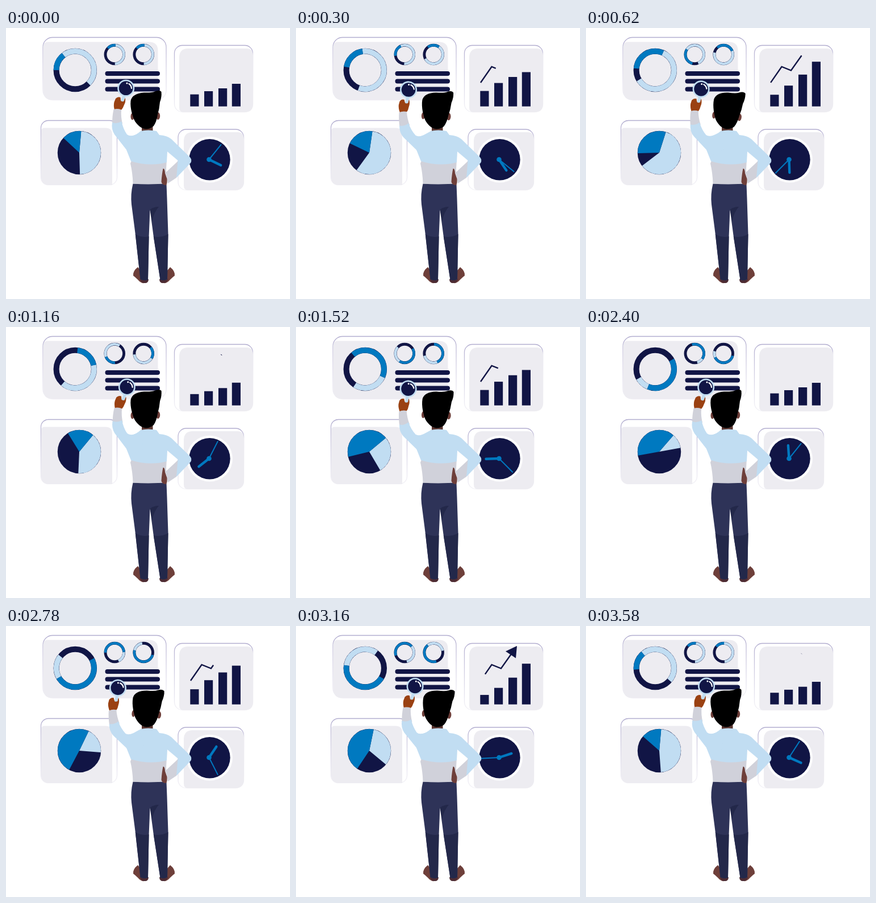
An HTML page for the animation above (3.6 s loop, 500x476 px).

```html
<!DOCTYPE html>
<html lang="en">
<head>
<meta charset="utf-8">
<title>Dashboard</title>
<style>
  html, body { margin: 0; width: 100%; height: 100%; overflow: hidden; background: #fff; }
  svg { display: block; width: 500px; height: 476px; }
  .navy { fill: #111545; }
  .light { fill: #c1ddf2; }
  .cloth { fill: #d0d1da; }
  .skin { fill: #6e3f3a; }
  .ring circle { fill: none; }
  .ring .base { stroke: #111545; }
  .ring .a { stroke: #c1ddf2; }
  .ring .b { stroke: #0079c0; }
  .hand { stroke: #0079c0; stroke-linecap: round; }
</style>
</head>
<body>
<svg viewBox="0 0 500 476" xmlns="http://www.w3.org/2000/svg">
  <defs>
    <linearGradient id="edge" x1="0" y1="0" x2="0" y2="1">
      <stop offset="0" stop-color="#b3aed0"/>
      <stop offset=".5" stop-color="#d6d3e5"/>
      <stop offset="1" stop-color="#f3f2f7"/>
    </linearGradient>
  </defs>

  <g fill="#fff" stroke="url(#edge)" stroke-width="1.300">
    <rect x="65" y="16.500" width="217" height="110" rx="17"/>
    <rect x="296.500" y="30.500" width="138" height="117" rx="14"/>
    <rect x="61.500" y="162.500" width="134" height="113" rx="13"/>
    <rect x="303" y="178" width="115.500" height="106.500" rx="14"/>
  </g>
  <g fill="#edecf1">
    <path d="M65.500 32Q66 24.500 74 24.500H252Q267.500 24.500 267.500 40V126.500H82Q65.500 126.500 65.500 109Z"/>
    <path d="M305 52Q305 36 321 36H423Q435 36 435 48V133Q435 148 420 148H313Q305 148 305 140Z"/>
    <path d="M62 181Q62 175.500 68 175.500H175Q187 175.500 187 187V276H76Q62 276 62 262Z"/>
    <path d="M313 199Q313 183 329 183H407Q419 183 419 195V269Q419 285 403 285H321Q313 285 313 277Z"/>
  </g>

  <path d="M178.500 80H267M178.500 93.500H267M178.500 107.500H267" stroke="#111545" stroke-width="8" stroke-linecap="round"/>
  <g id="charts"></g>

  <g id="bars" class="navy"></g>
  <path id="trend" d="M325 96L344.500 68L361 74.500L379.500 48.500" pathLength="1" fill="none" stroke="#111545" stroke-width="2.400"/>
  <path id="tip" class="navy" d="M389 35L369 44.500L387 56.500Z"/>

  <circle cx="358.500" cy="231.200" r="40.500" fill="#fff"/>
  <circle cx="358.500" cy="231.200" r="36.200" class="navy"/>
  <path id="hour" class="hand" d="M357.500 231V208" stroke-width="4.400"/>
  <path id="minute" class="hand" d="M357.500 231V197.500" stroke-width="2"/>
  <circle cx="357.500" cy="231" r="4.300" fill="#0079c0"/>

  <g class="skin">
    <path d="M232 420Q223 427 224 435Q228 438 232 442Q238 449 243 448Q251 448 250 441Z"/>
    <path d="M289 420Q298 427 297 435Q293 438 289 442Q283 449 278 448Q270 448 271 441Z"/>
  </g>
  <path d="M235 440Q242 445 251 441Q251 449 243 448Q238 448 235 440ZM286 440Q279 445 270 441Q270 449 278 448Q283 448 286 440Z" fill="#4d2c34"/>
  <path d="M223.500 273.500Q219 292 221 310L228 364L236.500 441Q243 445 250 442L251.500 368L253.500 319L259.500 364L271.500 442Q278 445 284 441L285.500 362L283.500 300L282.500 273.500Z" fill="#2e3358"/>
  <path d="M227.700 362Q239 369 251.600 366L250 442Q243 445 236.500 441ZM259.700 366Q273 369 285.500 362L284 441Q278 445 271.500 442ZM253.500 319Q260 314 269 314Q261 323 257.500 338Z" fill="#23284a"/>

  <path d="M239 172H258.500V184H239Z" fill="#5b3631"/>
  <path class="cloth" d="M222 230L283 230L281.500 258L284 273Q254 275.500 223.500 273.500Q223 255 219 238Z"/>
  <path class="light" d="M237 181Q250 178 265 181L270 188Q284 189 291 195L324 227Q328 232 325 237L300 263V237L303 233L284 217L283 236Q253 244 220 234L212 214L220 190Q230 188 237 181Z"/>
  <path class="cloth" d="M302.500 234L300 263L285 273L281 254Z"/>
  <path class="skin" d="M276.500 247Q279.500 246 280 255L283.500 265Q284 272 282 276Q274.500 276 273.500 270Q274.500 256 276.500 247Z"/>

  <g id="arm">
    <path d="M193 124Q197 120 201.500 122L202 127Q206 128 210 123Q211 130 208 135Q206 141 203 144H191Q189 136 190.500 130Z" fill="#9a4112"/>
    <path class="light" d="M205.500 118L210.500 120L207.500 128.500Q205 130 202 128Z"/>
    <path class="cloth" d="M189.500 143Q196 141 203 143.500Q202 156 205 168L187 168Q187 154 189.500 143Z"/>
    <path class="light" d="M187 166Q195 169 203.500 164Q206 177 213 187Q218 191 227 188L238 184L242 215L220 224L209 210L191 187Q185 178 187 166Z"/>
    <circle cx="211.200" cy="105.700" r="13.700" class="navy" stroke="#c1ddf2" stroke-width="2.600"/>
    <path d="M216.500 98Q220.500 100.500 221 106" fill="none" stroke="#fff" stroke-width="2.200" stroke-linecap="round"/>
    <circle cx="213" cy="97" r="1.500" fill="#fff"/>
  </g>

  <g id="head">
    <ellipse cx="267.500" cy="154.500" rx="3.700" ry="6.500" class="skin"/>
    <ellipse cx="222.500" cy="155.500" rx="3" ry="6" class="skin"/>
    <path d="M221.500 149Q218.500 137 219.500 128Q222 115 243 113.500Q257 114 262 111.500Q270 108 273.500 112Q274.500 121 271 130Q270 142 267 152Q265 165 260 172Q254 177.500 246 177.500Q238 176.500 232 170Q226 164 224 157Z"/>
  </g>
</svg>

<script>
const $ = id => document.getElementById(id);
const LOOP = 3600, STEP = 20, BEAT = 1200;
const { sin, cos, PI, min, max } = Math;
const rad = d => d * PI / 180;
const ease = p => (1 - cos(PI * min(1, max(0, p)))) / 2;
const spin = (id, deg, x, y) => $(id).setAttribute('transform', `rotate(${deg} ${x} ${y})`);

// centre, mid radius, stroke width, angle in degrees by phase
const charts = [
  { x: 121.8, y: 74, r: 33.2, w: 9.6, turn: d => d - 38 },
  { x: 191.3, y: 46.5, r: 16.3, w: 4.4, turn: d => 5 - d },
  { x: 242.2, y: 46.5, r: 16.3, w: 4.4, turn: d => 5 + d },
  { x: 129, y: 219, r: 19, w: 38, turn: d => 29 - 24 * cos(rad(d)) }
];
$('charts').innerHTML = charts.map(c => `<g class="ring" transform="translate(${c.x} ${c.y})">` +
  ['base', 'a', 'b'].map(k =>
    `<circle class="${k}" r="${c.r}" stroke-width="${c.w + (k === 'base' ? .5 : 0)}" pathLength="360"/>`).join('') +
  '</g>').join('');
charts.forEach((c, i) => {
  const g = $('charts').children[i];
  c.a = g.querySelector('.a');
  c.b = g.querySelector('.b');
});

// left edge, mean top, cosine and sine swing
const bars = [
  [324.3, 116.6, 0, 6],
  [349, 105.6, 5.4, 9],
  [374, 93.5, 12.5, 7.5],
  [397.8, 78.5, 19.5, 1]
];
$('bars').innerHTML = bars.map(b => `<rect x="${b[0]}" width="15.200"/>`).join('');

function arc(el, from, len) {
  el.setAttribute('transform', `rotate(${from - 90})`);
  el.setAttribute('stroke-dasharray', `${len} ${360 - len}`);
}

function draw(t) {
  const deg = t / LOOP * 360, a = rad(deg);
  const wave = (m, c1, s1, c2, s2, c3) =>
    m + c1 * cos(a) + s1 * sin(a) + c2 * cos(2 * a) + s2 * sin(2 * a) + c3 * cos(3 * a);
  const light = wave(122.9, 55.6, 62.5, 1.1, 5.9, -6.6);
  const navy = wave(108, -15, -21.4, -4.5, -3.1, 46.4);
  const blue = 360 - light - navy;
  for (const c of charts) {
    const from = c.turn(deg);
    arc(c.a, from, light);
    arc(c.b, from - blue, blue);
  }

  const u = t % BEAT, c = cos(2 * PI * u / BEAT), s = sin(2 * PI * u / BEAT);
  bars.forEach(([, m, p, q], i) => {
    const top = m + p * c - q * s, bar = $('bars').children[i];
    bar.setAttribute('y', top);
    bar.setAttribute('height', 137.7 - top);
  });

  const end = ease(u / 600), start = ease((u - 600) / 600);
  $('trend').setAttribute('stroke-dasharray', `0 ${start} ${end - start} 2`);
  $('trend').style.visibility = end > start ? 'visible' : 'hidden';
  const size = ease((u - 600) / 120) * (1 - ease((u - 1030) / 120));
  $('tip').setAttribute('transform', `translate(379 49) scale(${size}) translate(-379 -49)`);

  spin('hour', 116 + deg, 357.5, 231);
  spin('minute', 39 + 3 * deg, 357.5, 231);
  spin('arm', .573 * (4.8 * (c - 1) - 8.6 * s), 225, 205);
  spin('head', 3.1 * (1 - c), 247, 180);
}

const t0 = performance.now();
function tick() {
  const t = (performance.now() - t0) % LOOP;
  draw(t - t % STEP);
  requestAnimationFrame(tick);
}
tick();
</script>
</body>
</html>
```
